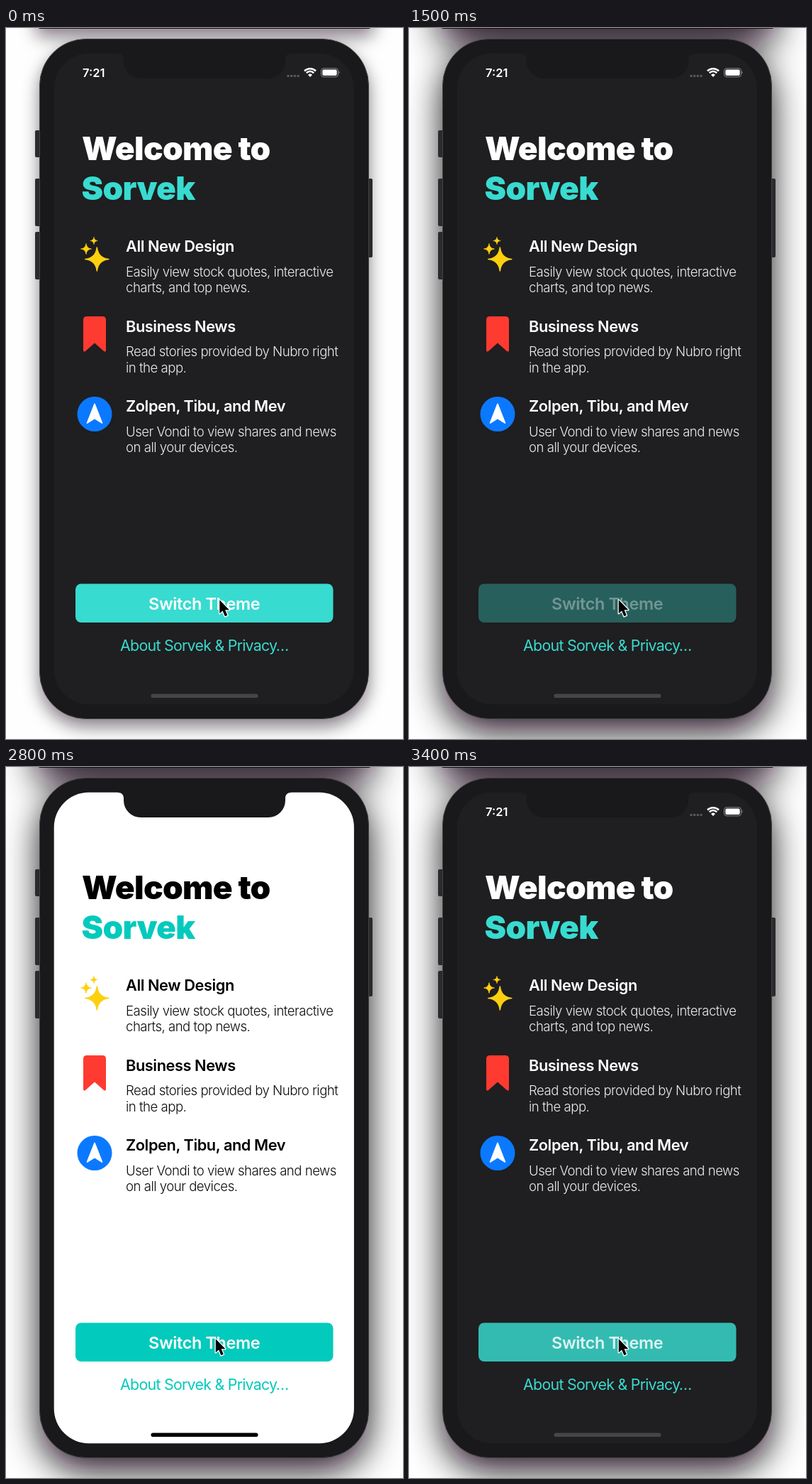
These frames come from a looping animation (560x1001 px, 3.5 s). An HTML page:

```html
<!DOCTYPE html>
<html lang="en">
<head>
<meta charset="utf-8">
<title>Theme switch</title>
<style>
  html, body { margin: 0; width: 100%; height: 100%; overflow: hidden; background: #fff; }
  svg {
    --screen: #1f1e20; --ink: #fff; --body: #ececee; --accent: #38dbd0; --bar: #464547;
    display: block; width: 100vw; height: 100vh;
    font-family: Inter, "Noto Sans", sans-serif; font-optical-sizing: none;
  }
  svg.light { --screen: #fff; --ink: #000; --body: #0c0c0c; --accent: #02cabd; --bar: #000; }
  .screen { fill: var(--screen); }
  .ink { fill: var(--ink); }
  .accent { fill: var(--accent); }
  .title { font-size: 46px; font-weight: 900; letter-spacing: -.7px; }
  .head { font-size: 21.8px; font-weight: 600; letter-spacing: -.44px; fill: var(--ink); }
  .copy { font-size: 18.6px; font-weight: 300; letter-spacing: -.5px; fill: var(--body); }
  .label { font-size: 23.5px; font-weight: 600; letter-spacing: -.4px; fill: #fff; }
  .link { font-size: 21.4px; letter-spacing: -.75px; }
  .clock { font-size: 16.5px; font-weight: 600; }
  .mid { text-anchor: middle; }
  .light .status { display: none; }
</style>
</head>
<body>
<svg id="stage" viewBox="0 0 560 1001" preserveAspectRatio="none">
  <defs>
    <filter id="soft" filterUnits="userSpaceOnUse" x="-100" y="-200" width="760" height="1400">
      <feGaussianBlur stdDeviation="12"/>
    </filter>
    <filter id="deep" filterUnits="userSpaceOnUse" x="-100" y="-200" width="760" height="1400">
      <feGaussianBlur stdDeviation="25"/>
    </filter>
    <g id="window" fill="#0a0610">
      <rect x="42" y="-80" width="476" height="81" rx="7"/>
      <rect x="47" y="15" width="465" height="958" rx="66"/>
    </g>
    <path id="spark" d="M0-16.5Q1.6-1.6 16.5 0Q1.6 1.6 0 16.5Q-1.6 1.6-16.5 0Q-1.6-1.6 0-16.5Z"
      fill="#fdd00f" stroke="#fdd00f" stroke-width="1.6" stroke-linejoin="round"/>
  </defs>

  <rect width="560" height="1001" fill="#fefefe"/>
  <use id="idle" href="#window" y="11" opacity=".5" filter="url(#soft)"/>
  <use id="active" href="#window" y="18" opacity=".9" filter="url(#deep)"/>
  <rect x="43" y="-80" width="474" height="81" rx="6" fill="#111"/>

  <g fill="#2b2a2c">
    <rect x="41" y="144" width="10" height="38" rx="2"/>
    <rect x="41" y="212" width="10" height="67" rx="2"/>
    <rect x="41" y="287" width="10" height="67" rx="2"/>
    <rect x="508" y="212" width="9" height="111" rx="2"/>
  </g>
  <rect x="47.5" y="15.5" width="464" height="957" rx="65.5" fill="#19181a" stroke="#434245"/>
  <rect class="screen" x="67.7" y="35.8" width="423.2" height="916.4" rx="49"/>
  <path d="M158 35V36C163 36 166 39 166 44V47A24 24 0 0 0 190 71H370A24 24 0 0 0 394 47V44C394 39 397 36 402 36V35Z" fill="#19181a"/>

  <g class="status" fill="#fff">
    <text class="clock" x="108" y="69">7:21</text>
    <g fill="#59585b">
      <circle cx="398" cy="67.5" r="1.8"/><circle cx="402.7" cy="67.5" r="1.8"/>
      <circle cx="407.4" cy="67.5" r="1.8"/><circle cx="412.1" cy="67.5" r="1.8"/>
    </g>
    <g fill="none" stroke="#fff" stroke-width="2.5">
      <path d="M421 60.5A11.3 11.3 0 0 1 437 60.5"/>
      <path d="M423.8 63.3A7.3 7.3 0 0 1 434.2 63.3"/>
    </g>
    <path d="M429 69L426 66A4.3 4.3 0 0 1 432 66Z"/>
    <rect x="444.5" y="56.8" width="24" height="12" rx="3.5" fill="none" stroke="#8b8a8d"/>
    <rect x="446.3" y="58.6" width="20.4" height="8.4" rx="2"/>
    <path d="M469.7 60.6Q471.6 62.8 469.7 65Z" fill="#8b8a8d"/>
  </g>

  <text class="title ink" x="107" y="185.8">Welcome to</text>
  <text class="title accent" x="106.5" y="241.8">Sorvek</text>

  <use href="#spark" transform="translate(128.3 325.5)"/>
  <use href="#spark" transform="translate(113 311) scale(.45)"/>
  <use href="#spark" transform="translate(124 299.5) scale(.32)"/>
  <path d="M114 406H136Q141 406 141 411V453Q141 457 138 455L125 443.5L112 455Q109 457 109 453V411Q109 406 114 406Z" fill="#ff3a30"/>
  <circle cx="125" cy="543.5" r="24.5" fill="#0b79ff"/>
  <path d="M125 529.5L135.4 556L125 549.6L114.6 556Z" fill="#fff" stroke="#fff" stroke-width="1.8" stroke-linejoin="round"/>
  <g id="features"></g>

  <rect id="button" class="accent" x="98" y="782.5" width="363.5" height="54.5" rx="8"/>
  <text id="label" class="label mid" x="279.7" y="818.5">Switch Theme</text>
  <text class="link accent mid" x="279.8" y="877">About Sorvek &amp; Privacy…</text>
  <rect x="204.5" y="937.5" width="151" height="5.6" rx="2.8" fill="var(--bar)"/>

  <path id="cursor" d="M0 0V19L4.3 15.1L7.6 23L11 21.5L7.8 13.9H13.6Z"
    stroke="#fff" stroke-width="2.6" stroke-linejoin="round" paint-order="stroke"/>
</svg>
<script>
const LOOP = 3500, STEP = 100;
const $ = id => document.getElementById(id);

const features = [
  ["All New Design", "Easily view stock quotes, interactive", "charts, and top news."],
  ["Business News", "Read stories provided by Nubro right", "in the app."],
  ["Zolpen, Tibu, and Mev", "User Vondi to view shares and news", "on all your devices."]
];

function addText(cls, y, str) {
  const el = document.createElementNS("http://www.w3.org/2000/svg", "text");
  el.setAttribute("class", cls);
  el.setAttribute("x", 169);
  el.setAttribute("y", y);
  el.textContent = str;
  $("features").append(el);
}

features.forEach(([head, first, second], i) => {
  const y = 315 + i * 112.5;
  addText("head", y, head);
  addText("copy", y + 34.6, first);
  addText("copy", y + 57, second);
});

// [time, value] pairs, linear in between
const fade = [[1300, 1], [1400, .7], [1500, .34], [1600, .755], [1700, .93], [1800, 1],
              [3000, 1], [3100, .75], [3200, .42], [3300, .56], [3400, .83]];
const cursorX = [[200, 301.3], [500, 295.8]];

function track(keys, t) {
  if (t <= keys[0][0]) return keys[0][1];
  for (let i = 1; i < keys.length; i++) {
    const [t0, a] = keys[i - 1], [t1, b] = keys[i];
    if (t <= t1) return a + (b - a) * (t - t0) / (t1 - t0);
  }
  return keys[keys.length - 1][1];
}

function draw(now) {
  const t = Math.floor(now % LOOP / STEP) * STEP;
  const focused = t >= 1300;
  const alpha = track(fade, t);
  $("stage").classList.toggle("light", t >= 1600 && t < 3300);
  $("idle").style.display = focused ? "none" : "";
  $("active").style.display = focused ? "" : "none";
  $("button").style.opacity = alpha;
  $("label").style.opacity = alpha;
  $("cursor").setAttribute("transform", `translate(${track(cursorX, t)} 805.3)`);
}

const start = performance.now();
function loop() {
  draw(performance.now() - start);
  requestAnimationFrame(loop);
}
loop();
</script>
</body>
</html>
```
